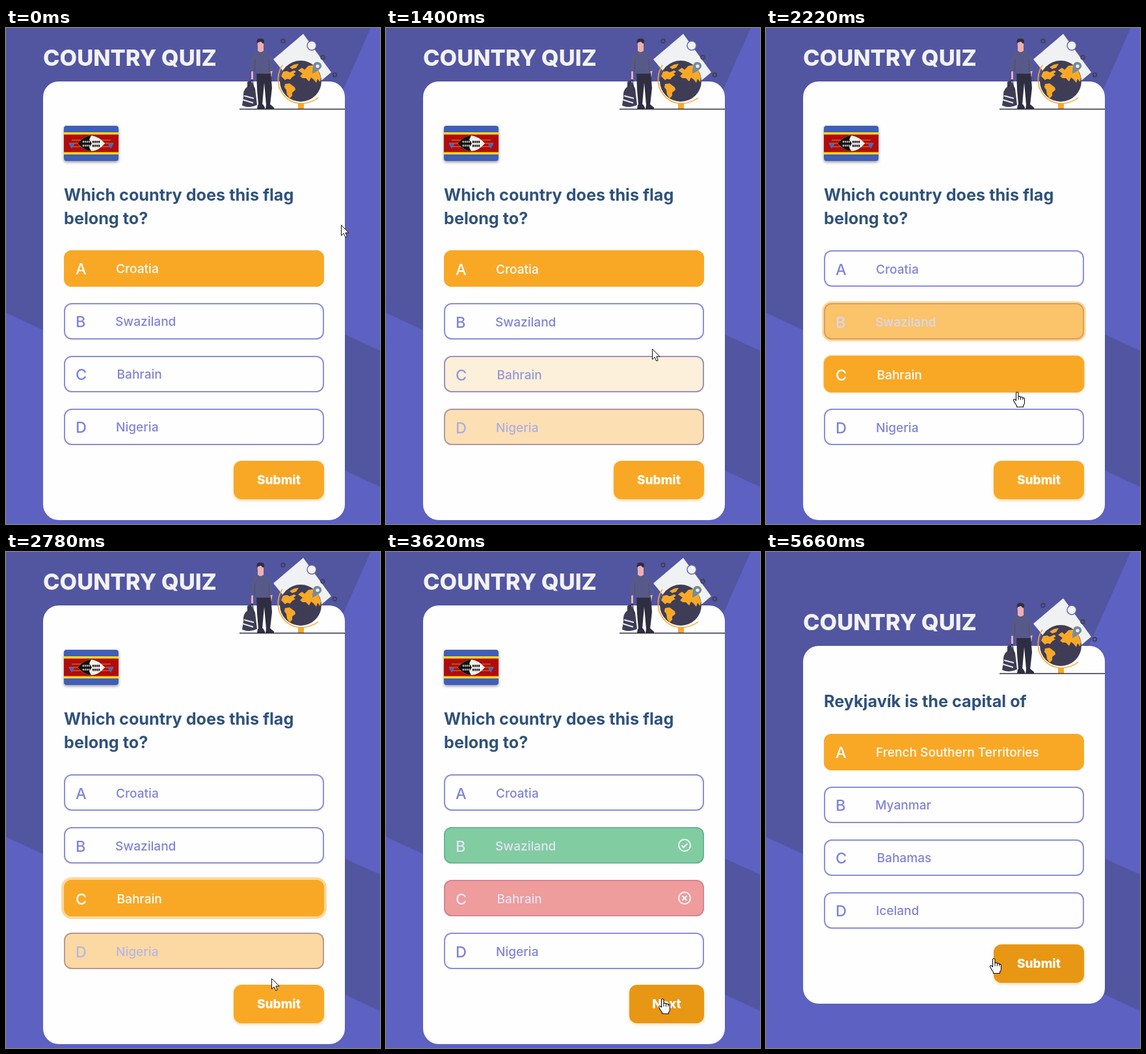
These frames come from a looping animation (575x761 px, 6120 ms). An HTML page with a canvas:

```html
<!DOCTYPE html>
<html lang="en">
<head>
<meta charset="utf-8">
<title>Country quiz</title>
<style>
html, body { margin: 0; width: 100%; height: 100%; overflow: hidden; background: #5c61c2; }
canvas { display: block; width: 575px; height: 761px; }
</style>
</head>
<body>
<canvas id="stage" width="575" height="761"></canvas>
<script>
const ctx = document.getElementById('stage').getContext('2d');
const LOOP = 6120, FADE = 450;
const SANS = 'Inter, "Open Sans", sans-serif';
const ORANGE = [249, 168, 38], DARK_ORANGE = [232, 151, 20], WHITE = [254, 254, 254];
const GREEN = [96, 191, 136], RED = [234, 130, 130], NAVY = [29, 53, 93];
const BORDER = [138, 142, 218], LABEL = [128, 131, 214];
const INK = '#3f3d56', INK2 = '#2f2e41', GOLD = '#f9a826', SKIN = '#eeb0b0';

// Moments of the story
const VERDICT = 3400, RESULTS = 4100, RESTART = 5380;

// Bursts of movement: start, end, number of steps
const bursts = [[570, 1120, 9], [1200, 1810, 10], [1880, 2430, 9], [2500, 3060, 9],
  [3130, 3690, 9], [3760, 3900, 3], [4100, 4230, 3], [4560, 5110, 8], [5180, 5660, 8]];

// Pointer path: time, x, y
const path = [[0, 515, 302], [560, 515, 302], [640, 514, 500], [705, 478, 606], [850, 452, 632],
  [980, 434, 648], [1195, 434, 648], [1265, 430, 628], [1340, 420, 545], [1430, 404, 470],
  [1500, 394, 452], [1620, 393, 456], [1680, 394, 490], [1742, 396, 535], [1880, 394, 542],
  [2130, 388, 545], [2280, 385, 566], [2360, 386, 590], [2480, 392, 612], [2640, 402, 640],
  [2770, 407, 652], [2850, 416, 668], [3000, 425, 685], [4100, 425, 685],
  [4101, 422, 684], [4500, 422, 684], [4560, 419, 685], [4850, 388, 655], [5110, 354, 627],
  [5380, 350, 623], [LOOP, 350, 623]];

// Fade targets: time, value
const fills = [
  [[-999, 1], [1600, 0]],
  [[1430, 1], [2130, 0]],
  [[1340, 1], [1420, 0], [1745, 1]],
  [[700, 1], [900, 0], [1230, 1], [1340, 0], [2350, 1], [2640, 0]]
];
const rings = [[], [[1600, 1], [2130, 0]], [[2130, 1], [2900, 0]], []];

const quizzes = [
  { dy: 0, lines: ['Which country does this flag', 'belong to?'], answers: ['Croatia', 'Swaziland', 'Bahrain', 'Nigeria'] },
  { dy: -62, lines: ['Reykjavík is the capital of'], answers: ['French Southern Territories', 'Myanmar', 'Bahamas', 'Iceland'] }
];

const clamp = x => Math.max(0, Math.min(1, x));
const rgb = c => `rgb(${c.map(Math.round).join()})`;
const mix = (a, b, p) => a.map((v, i) => v + (b[i] - v) * p);

// cubic-bezier(.25, .1, .25, 1)
function ease(x) {
  x = clamp(x);
  let lo = 0, hi = 1;
  const bez = (s, a, b) => 3 * a * s * (1 - s) ** 2 + 3 * b * s * s * (1 - s) + s ** 3;
  for (let i = 0; i < 16; i++) {
    const m = (lo + hi) / 2;
    if (bez(m, .25, .25) < x) lo = m; else hi = m;
  }
  return bez(lo, .1, 1);
}

function track(keys, t) {
  let v = 0;
  keys.forEach(([at, to], i) => {
    if (t < at) return;
    const end = keys[i + 1] ? Math.min(t, keys[i + 1][0]) : t;
    v += (to - v) * ease((end - at) / FADE);
  });
  return v;
}

function snap(t) {
  let out = 0;
  for (const [s, e, n] of bursts) {
    if (t < s) break;
    const k = Math.min(n - 1, Math.floor((t - s) / (e - s) * (n - 1) + .15));
    out = s + k * (e - s) / (n - 1);
  }
  return out;
}

function pointerAt(t) {
  const i = Math.max(1, path.findIndex(p => p[0] >= t));
  const [a, b] = [path[i - 1], path[i]], p = clamp((t - a[0]) / (b[0] - a[0]));
  return [a[1] + (b[1] - a[1]) * p, a[2] + (b[2] - a[2]) * p];
}

function shape(d, fill, stroke, width = 1) {
  const p = new Path2D(d);
  if (fill) { ctx.fillStyle = fill; ctx.fill(p); }
  if (stroke) { ctx.strokeStyle = stroke; ctx.lineWidth = width; ctx.stroke(p); }
}
function oval(x, y, rx, ry, fill, stroke, width = 1) {
  ctx.beginPath();
  ctx.ellipse(x, y, rx, ry, 0, 0, 7);
  if (fill) { ctx.fillStyle = fill; ctx.fill(); }
  if (stroke) { ctx.strokeStyle = stroke; ctx.lineWidth = width; ctx.stroke(); }
}
function rect(x, y, w, h, fill) {
  ctx.fillStyle = fill;
  ctx.fillRect(x, y, w, h);
}
function box(x, y, w, h, r, fill, stroke) {
  ctx.beginPath();
  ctx.roundRect(x, y, w, h, r);
  ctx.fillStyle = fill;
  ctx.fill();
  if (!stroke) return;
  ctx.beginPath();
  ctx.roundRect(x + 1, y + 1, w - 2, h - 2, r - 1);
  ctx.strokeStyle = stroke;
  ctx.lineWidth = 2;
  ctx.stroke();
}
function shadow(color, dy, blur) {
  ctx.shadowColor = color;
  ctx.shadowOffsetY = dy;
  ctx.shadowBlur = blur;
}
function text(s, x, y, size, weight, color, align = 'left', family = SANS) {
  ctx.font = `${weight} ${size}px ${family}`;
  ctx.textAlign = align;
  ctx.fillStyle = color;
  ctx.fillText(s, x, y);
}

function backdrop() {
  rect(0, 0, 575, 761, '#5c61c2');
  shape('M0 0H560.5L379.5 406L575 495V704L0 437Z', '#5255a0');
}
function card(y, h, titleY) {
  box(57, y, 464, h, 24, rgb(WHITE));
  text('COUNTRY QUIZ', 57, titleY, 34.4, 800, '#f2f2f2');
}

function flag() {
  ctx.save();
  shadow('rgba(0,0,0,.4)', 2, 4);
  box(89, 150, 84, 54, 4, '#3e5eb9');
  ctx.restore();
  rect(89, 160, 84, 34, '#ffd91a');
  rect(89, 163.5, 84, 27, '#b10c0c');
  for (const y of [172, 177, 182]) {
    shape(`M${y === 177 ? 97 : 101} ${y}H${y === 177 ? 165 : 161}`, null, '#d98a20', 1.2);
  }
  shape('M98 178l3 5l3-5zM158 178l3 5l3-5z', '#3e5eb9', '#4c6ac0', 2);
  shape('M110 177Q121 165 131 165Q142 166 152 177Q142 189 131 189Q120 188 110 177Z', '#f4f0ee');
  shape('M110 177Q121 165 131 165L128 171L132 177L128 183L131 189Q120 188 110 177Z', '#111');
  for (let i = 0; i < 4; i++) {
    rect(118 + i * 3, 173, 1.5, 3, '#eee');
    rect(118 + i * 3, 179, 1.5, 3, '#eee');
    rect(133 + i * 3, 173, 2, 3.5, '#111');
    rect(133 + i * 3, 179, 2, 3.5, '#111');
  }
}

function traveller() {
  // board, dots and globe
  shape('M457 9L500 68L457 104L411 48Z', '#f0f1f2');
  oval(470, 27, 7, 7, '#f2f2f4', '#6468b8', 1.5);
  for (const [x, y] of [[426, 20], [487, 45], [505.5, 72]]) oval(x, y, 2.8, 2.8, null, INK, 1.8);
  shape('M425 57Q415 72 420 91Q430 115 454 116Q470 115 480 107', null, GOLD, 1.6);
  oval(453, 81.5, 32, 31.5, INK);
  shape('M423 74L426 67L432 66L436 68L443 65L446 67L442 70L445 72L440 75L437 79L432 78L429 80L426 77Z', GOLD);
  shape('M429 86L436 85L444 91L445 95L440 99L440 104L436 108L432 102L431 95L428 91Z', GOLD);
  shape('M449 65L455 61L459 64L465 58L473 57L480 65L484 75L483 83L479 78L477 84L473 79L469 76L466 82L461 77L456 77L452 74L456 70Z', GOLD);
  shape('M436 60L443 56L450 55L446 61L440 63Z', GOLD);
  shape('M471 70Q471 64 472 60Q472 52 479 52Q486 53 485 60Q482 65 471 70Z', '#748c9c');
  oval(479, 58.5, 2.6, 2.6, '#f0f1f2');
  rect(449, 115.5, 9, 9, GOLD);

  // backpack
  shape('M371 83Q375 79 378 83L383 93L386 118Q375 124 363 119L365 106Q364 95 371 90Z', INK);
  shape('M366 104L381 108M364 110L380 115', null, '#e9e9ef', 2.2);
  shape('M373 91Q375 82 379 78L381 96', null, INK2, 1.2);

  // person
  shape('M377 66L380 66L380 79L377 79ZM406 64L410 64L408 75L405 76Z', SKIN);
  shape('M385 68H407L409 92L406 118H400L397 84L394 118H388L386 94Z', INK2);
  shape('M387 118L395 117L398 122V124H386ZM400 118L406 117L412 122V124H399Z', INK2);
  shape('M387 24L396 24L396 37H387Z', SKIN);
  oval(391, 25, 4.4, 6.5, SKIN);
  shape('M386 24Q384 16 391 16Q398 16 397 22L395 24L392 21L388 22Z', INK2);
  shape('M387 35Q391 39 396 35L404 39Q409 45 411 65L406 67L407 70H384L382 66L376 67Q375 48 379 41Z', '#575a89');
  shape('M383 48L382 67M404 48L405 67', null, '#4a4c79', 1);
  shape('M359 124.5H521', null, INK2, 1.4);
}

function celebration() {
  ctx.save();
  ctx.beginPath();
  ctx.rect(160, 180, 260, 145);
  ctx.clip();
  shape('M213 326Q188 326 179 304Q165 284 172 259Q180 236 208 233Q226 201 266 198Q303 190 335 210Q365 202 385 224Q396 241 392 260Q408 266 408 281Q407 294 401 299Q406 326 383 326Z', '#fef0d4');
  shape('M178 243Q200 230 216 240L249 244Q263 247 279 250H181ZM303 286Q326 283 334 277Q357 273 372 266Q395 266 408 278V286ZM179 294Q194 296 199 306Q218 308 227 316H180Z', '#fff7e9');
  ctx.restore();
  shape('M323 204L328 195L333 193L329 203ZM337 203Q344 192 353 193Q353 202 343 205Z', '#fff2dc');

  // trophy
  shape('M264 243H250Q248 267 280 281M310 243H323Q326 267 294 281', null, GOLD, 3.5);
  shape('M262 236H312Q313 272 295 283Q291 287 294 299L300 305H274L281 297Q282 287 278 282Q261 271 262 236Z', GOLD);
  shape('M262 236H269Q268 270 283 285Q261 274 262 236Z', '#eb9d20');
  rect(267, 304, 40, 22, GOLD);
  rect(267, 304, 40, 3, '#eb9d20');
  rect(274, 314, 26, 7, INK);
  shape('M353 325L356 321L360 323L361 318L363 322L368 321L365 325Z', GOLD);

  // left figure
  shape('M230 249L221 233M240 256L244 229', null, SKIN, 2.6);
  oval(234, 254, 3.5, 5, SKIN);
  shape('M216 265Q221 260 223 250Q226 244 231 245Q236 246 233 251L230 260L224 269Z', INK2);
  shape('M233 260L242 256L246 263L245 277L234 276Z', '#e3e5ee');
  shape('M229 261L234 261L236 277L230 275ZM243 257L247 263L246 277L244 275Z', '#d9736f');
  shape('M231 275L245 277L242 298L239 320H235L235 299L227 290L206 287L205 283L226 284Z', INK2);
  shape('M230 321L240 318V324H230ZM201 283L207 282L208 288L205 289Z', INK2);

  // right figure
  shape('M322 231L316 216L319 212M347 244L354 236', null, '#e08080', 3.5);
  oval(334, 229, 4, 5.5, '#e08080');
  shape('M329 229Q327 220 334 220Q341 221 338 227L333 225Z', INK2);
  shape('M318 226L326 236L337 236L349 245L345 249L339 245L340 263L322 261L323 245L315 230Z', INK);
  shape('M329 237L335 237L333 254L329 259Z', '#e6e7f0');
  shape('M323 258L341 258L357 264L361 257L365 260L360 271L344 270L338 274L342 290L337 292L330 279L320 283L319 276Z', '#575570');
  shape('M357 256L364 257L365 261L359 262ZM334 290L341 287L342 293L337 296ZM319 275L322 285L327 286L326 278Z', INK2);
}

function mark(y, wrong, color) {
  oval(459, y, 9, 9, null, color, 2);
  const d = wrong ? `M455.5 ${y - 3.5}l7 7m0 -7l-7 7` : `M454.5 ${y}l3 3.2l6 -6`;
  shape(d, null, color, 2);
}

function option(i, y, label, fill, ring, verdict, nudge) {
  const tint = verdict === null ? ORANGE : i === 1 ? GREEN : RED;
  const p = verdict === null ? fill : verdict;
  if (ring > .02) box(89 - 4 * ring, y - 4 * ring, 400 + 8 * ring, 56 + 8 * ring, 12 + 4 * ring, 'rgba(249,168,38,.45)');
  box(89, y, 400, 56, 12, rgb(mix(WHITE, tint, p)), rgb(mix(BORDER, tint, p)));
  const ink = rgb(mix(LABEL, WHITE, p));
  text('ABCD'[i], 107, y + 36.5 + nudge, 23.5, 500, ink);
  text(label, [169, 168, 170.5, 169][i], y + 34.5 + nudge, 19.1, 500, ink);
  if (verdict !== null) mark(y + 28, i === 2, rgb(mix(WHITE, tint, .06)));
}

function button(label, x, y, hover) {
  const w = 489 - x;
  ctx.save();
  shadow('rgba(249,168,38,.4)', 2, 4);
  box(x, y, w, 59, 12, rgb(mix(ORANGE, DARK_ORANGE, hover)));
  ctx.restore();
  text(label, x + w / 2, y + 36, 19, 800, '#fff', 'center');
}

function quiz(t, second) {
  const q = quizzes[+second], judged = !second && t >= VERDICT;
  card(82 - q.dy, second ? 549 : 673, 57.5 - q.dy);
  ctx.save();
  ctx.translate(0, -q.dy);
  traveller();
  ctx.restore();
  if (!second) flag();
  q.lines.forEach((s, i) => text(s, 89, (second ? 238 : 265) + i * 35.5, 25.2, 700, '#2f527b'));
  const nudge = !second && t >= 1200 ? 1 : 0;
  q.answers.forEach((label, i) => {
    const fill = second ? +(i === 0) : judged ? 0 : track(fills[i], t);
    const ring = second || judged ? 0 : track(rings[i], t);
    const verdict = judged && (i === 1 || i === 2) ? ease((t - VERDICT) / FADE) : null;
    option(i, 341 + 81 * i + q.dy, label, fill, ring, verdict, nudge);
  });
  const hover = ease((t - (second ? RESTART : 2850)) / 250);
  button(judged ? 'Next' : 'Submit', judged ? 374 : 350, 664 + q.dy, hover);
}

function results(t) {
  card(148, 541, 123.5);
  celebration();
  text('Results', 289, 450, 47.6, 800, rgb(NAVY), 'center');
  text('You got', 170.5, 510, 19, 400, rgb(NAVY));
  text('0', 255.5, 510, 37, 800, rgb(GREEN), 'center');
  text('correct answer', 271.5, 510, 19, 400, rgb(NAVY));
  const p = ease((t - 4850) / 300);
  box(186, 596, 206, 61, 12, rgb(mix(WHITE, NAVY, p)), rgb(NAVY));
  text('Try again', 289, 632, 17.8, 700, rgb(mix(NAVY, WHITE, p)), 'center', '"Liberation Sans", Arial, sans-serif');
}

function overControl(x, y, t) {
  const inside = (l, top, r, b) => x >= l && x <= r && y >= top && y <= b;
  if (t >= RESULTS && t < RESTART) return inside(186, 596, 392, 657);
  const dy = t >= RESTART ? -62 : 0;
  if (inside(350, 664 + dy, 489, 723 + dy)) return true;
  return [0, 1, 2, 3].some(i => inside(89, 341 + 81 * i + dy, 489, 397 + 81 * i + dy));
}

function pointer(t) {
  const [x, y] = pointerAt(t).map(Math.round);
  ctx.save();
  ctx.translate(x + .5, y + .5);
  ctx.lineJoin = 'round';
  if (overControl(x, y, t)) {
    shape('M-2 12V1.5Q-.3 -1 1.5 1.5V7Q4 6 5 8Q7.5 7 8.3 9Q11 8.5 11 11V16Q11 19 9 21V23H-1V21Q-4 17 -6 13Q-6 10 -3.5 11.5L-2 13Z', '#fff', '#111', 1.1);
    shape('M1.5 7V12M5 8V12M8.3 9V12', null, '#111');
  } else {
    shape('M0 0V16L3.7 12.6L6.3 18.5L8.8 17.4L6.3 11.6H11.5Z', '#fff', '#111');
  }
  ctx.restore();
}

function frame() {
  const t = snap(performance.now() % LOOP);
  backdrop();
  if (t >= RESULTS && t < RESTART) results(t);
  else quiz(t, t >= RESTART);
  pointer(t);
  requestAnimationFrame(frame);
}
frame();
</script>
</body>
</html>
```
